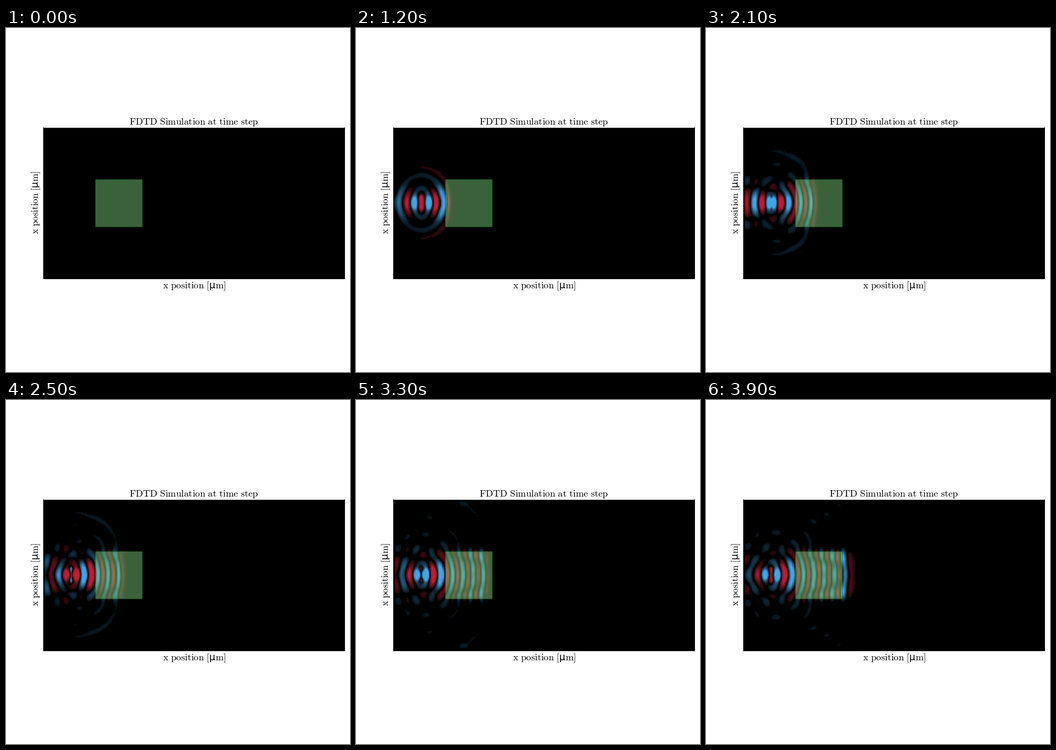
A matplotlib script that plays this animation: 748 px wide and 748 px high, repeating every 4 s.

```python
import numpy as np
import matplotlib.pyplot as plt
from matplotlib.animation import FuncAnimation
from matplotlib.colors import LinearSegmentedColormap
from matplotlib.patches import Rectangle

plt.rcParams["mathtext.fontset"] = "cm"
plt.rcParams["font.family"] = "DejaVu Sans"

SIZE, DPI = 748, 100
FRAMES, INTERVAL, SKIP = 40, 100, 4

# Grid in cells of 0.1 um
NX, NY = 321, 161
COURANT = 1 / np.sqrt(2)
WAVELENGTH = 15.5
SOURCE_X, SOURCE_Y = 30, slice(72, 89)
BLOCK = slice(55, 106)

# Colour scale and the faintest visible levels
VMAX = 0.52
RED_FLOOR, BLUE_FLOOR = 0.17, 0.1

# Axes box in pixels, measured from the top left
LEFT, RIGHT, TOP, BOTTOM = 80.5, 735.5, 216.5, 544.5


def absorber(count, strength=0.08):
    """Loss per step, rising linearly over the outer tenth at both ends."""
    width = count // 10
    edge = np.minimum(np.arange(count), np.arange(count)[::-1])
    return strength * np.clip(1 - edge / width, 0, 1)


def visible(e):
    level = np.clip(e / VMAX, -1, 1)
    floor = np.where(level > 0, RED_FLOOR, BLUE_FLOOR)
    floor[BLOCK, BLOCK] = 0
    return np.where(np.abs(level) < floor, 0, level)


def simulate():
    """Yee scheme with lossy borders; returns every SKIP-th field."""
    eps = np.ones((NY, NX))
    eps[BLOCK, BLOCK] = 2
    loss = (absorber(NX)[None, :] + absorber(NY)[:, None])[1:-1, 1:-1] / 2
    keep = (1 - loss) / (1 + loss)
    gain = COURANT / eps[1:-1, 1:-1] / (1 + loss)
    e = np.zeros((NY, NX))
    hx = np.zeros((NY - 1, NX))
    hy = np.zeros((NY, NX - 1))
    omega = 2 * np.pi * COURANT / WAVELENGTH
    fields = []
    for step in range((FRAMES - 1) * SKIP + 1):
        hx -= COURANT * np.diff(e, axis=0)
        hy += COURANT * np.diff(e, axis=1)
        curl = np.diff(hy, axis=1)[1:-1] - np.diff(hx, axis=0)[:, 1:-1]
        e[1:-1, 1:-1] = keep * e[1:-1, 1:-1] + gain * curl
        e[SOURCE_Y, SOURCE_X] += np.sin(omega * step)
        if step % SKIP == 0:
            fields.append(visible(e))
    return fields


def roman(text):
    """Upright math text, one group per letter so that no pair is kerned."""
    parts = (r"\ " if c == " " else r"\mathrm{%s}" % c for c in text)
    return "$" + "".join(parts) + "$"


def label(x, y, text, **kwargs):
    fig.text(x / SIZE, 1 - y / SIZE, text, fontsize=15, ha="center",
             va="baseline", rotation_mode="anchor", **kwargs)


fields = simulate()
cmap = LinearSegmentedColormap.from_list(
    "blue_black_red", ["#3ea6e8", "#000000", "#be1c32"])

fig = plt.figure(figsize=(SIZE / DPI, SIZE / DPI), dpi=DPI, facecolor="white")
ax = fig.add_axes([LEFT / SIZE, 1 - BOTTOM / SIZE,
                   (RIGHT - LEFT) / SIZE, (BOTTOM - TOP) / SIZE],
                  facecolor="black")
ax.set(xticks=[], yticks=[])

image = ax.imshow(fields[0], cmap=cmap, vmin=-1, vmax=1, origin="lower",
                  interpolation="nearest", aspect="auto",
                  extent=(-0.5, NX - 0.5, -0.5, NY - 0.5))
ax.set_xlim(0, NX - 1)
ax.set_ylim(0, NY - 1)

# Dielectric block
ax.add_patch(Rectangle((55.4, 54.9), 50, 50, facecolor=(0.565, 0.933, 0.565, 0.41),
                       edgecolor=(0, 0.4, 0, 0.6), linewidth=0.8, zorder=3))

AXIS_TEXT = roman("x position [") + "µ" + roman("m]")
label(408.5, 209.7, roman("FDTD Simulation at time step"))
label(409, 566, AXIS_TEXT)
label(70, 380, AXIS_TEXT, rotation=90)


def update(frame):
    image.set_data(fields[frame])
    return [image]


anim = FuncAnimation(fig, update, frames=FRAMES, interval=INTERVAL,
                     repeat=True, repeat_delay=0, blit=False)
plt.show()
```
